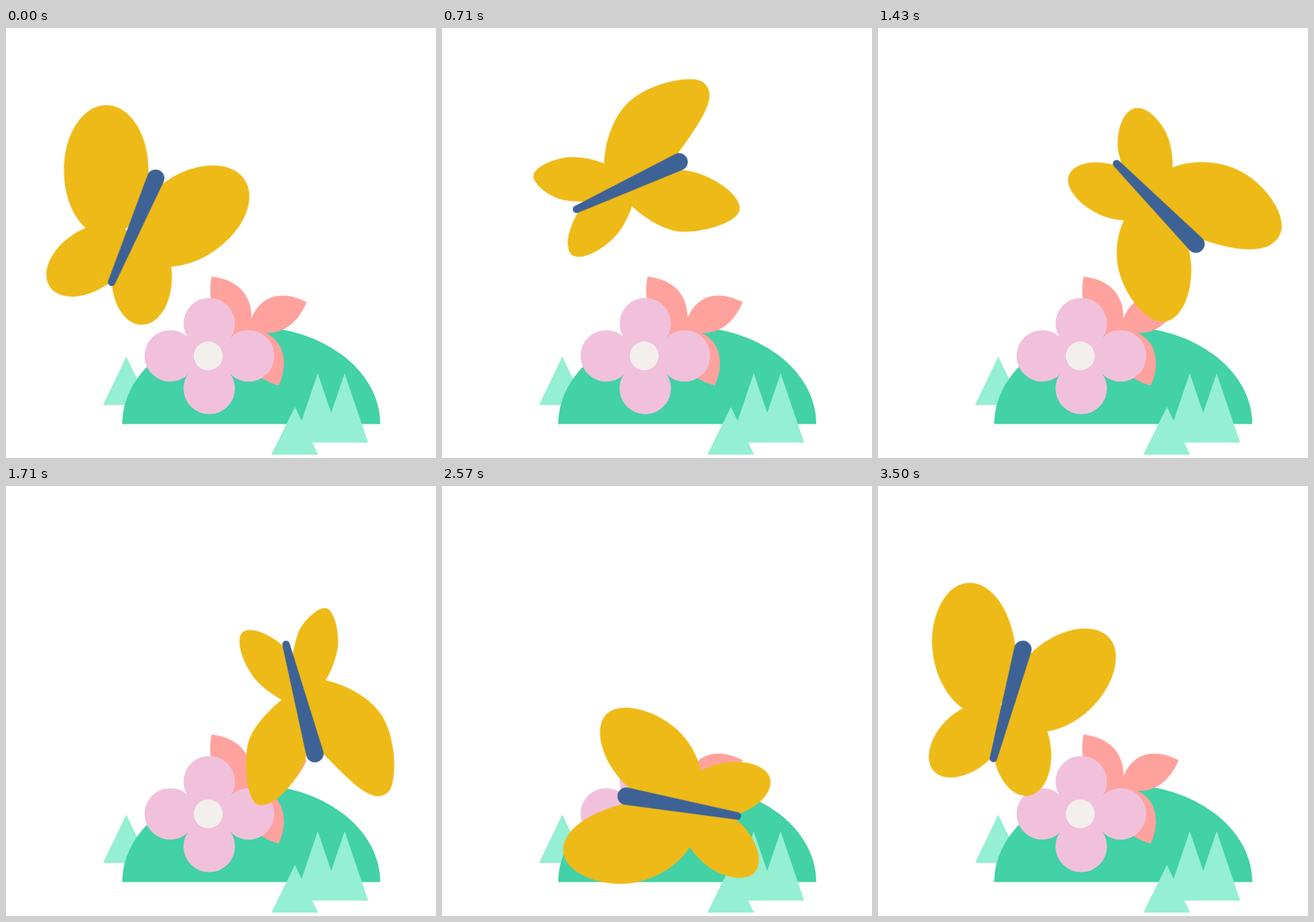
Write an HTML page without scripts that moves like this. It is 640x640 px and loops after 3.57 s.

```html
<!DOCTYPE html>
<html lang="en">
<head>
<meta charset="utf-8">
<title>Butterfly over a hill</title>
<style>
html, body { margin: 0; width: 100%; height: 100%; overflow: hidden; background: #fff; }
svg { display: block; width: 100%; height: 100%; }

.tree { fill: #94efd3; }
.hill { fill: #43d1a6; }
.leaf { fill: #ffa29d; }
.petal { fill: #f1c1dc; }
.wing { fill: #eeba18; }

.fly { animation: fly 3570ms linear infinite; }
.turn { animation: turn 3570ms linear infinite; }
.wing path { animation: 595ms linear infinite alternate; }
.ul { animation-name: ul !important; }
.ur { animation-name: ur !important; }
.ll { animation-name: ll !important; }
.lr { animation-name: lr !important; }

@keyframes fly {
  0%, 100% { transform: translate(189.5px, 302px); }
  7.98% { transform: translate(221px, 269px); }
  15.97% { transform: translate(260.5px, 247px); }
  19.89% { transform: translate(275.5px, 235px); }
  25.91% { transform: translate(318px, 222px); }
  31.93% { transform: translate(363px, 224px); }
  39.92% { transform: translate(413px, 260px); }
  47.9% { transform: translate(438px, 316px); }
  56.02% { transform: translate(442px, 380px); }
  64.15% { transform: translate(410px, 434px); }
  68.07% { transform: translate(387.5px, 459.5px); }
  71.99% { transform: translate(358px, 476.5px); }
  76.05% { transform: translate(319px, 482px); }
  80.11% { transform: translate(280px, 476px); }
  85.99% { transform: translate(241px, 443px); }
  92.02% { transform: translate(208px, 389px); }
  98.04% { transform: translate(193.5px, 325.5px); }
}
@keyframes turn {
  0% { transform: rotate(0deg); }
  19.89% { transform: rotate(42.2deg); }
  31.93% { transform: rotate(81.6deg); }
  47.9% { transform: rotate(142.2deg); }
  71.99% { transform: rotate(257.1deg); }
  85.99% { transform: rotate(308.3deg); }
  98.04% { transform: rotate(352.1deg); }
  100% { transform: rotate(360deg); }
}

/* folded wings; the open ones are in the markup */
@keyframes ul { to { d: path("M176 111C203 111 204 149 213 217C219 259 185 327 168 319.5C151 312 112 261 112 215.6C112 172 159 111 176 111Z"); } }
@keyframes ur { to { d: path("M333.6 214.2C341.8 232.5 301.7 284 286.4 294C268.6 306 233 312 201 315C187 299 207 248.5 234.3 229.2C261.5 207.6 322 196 333.6 214.2Z"); } }
@keyframes ll { to { d: path("M185.4 299C206.6 324.7 144 374 126.4 383C111 389.6 82.6 391.8 78 383.8C71.2 373.4 92 334.7 106.2 324.6C123.8 309.7 158.3 287.3 185.4 299Z"); } }
@keyframes lr { to { d: path("M199.6 300C209.2 306 222 347.5 222 367.4C222 398 209.2 432.5 195 431.3C183 429 172.5 412.3 164 387.7C160.6 365.4 180.6 300 199.6 300Z"); } }
</style>
</head>
<body>
<svg viewBox="0 0 640 640">
  <path class="tree" d="M179 489L213.5 561H144.500Z"/>
  <path class="hill" d="M173 589.500A192 145 0 0 1 557 589.500Z"/>
  <path class="leaf" d="M306 370C345 374 366 398 365.500 432C378 400 408 388 447.500 408C434 440 412 455 386 454C414 466 421 499 406 532C370 523 350 495 340 460C310 440 299 405 306 370Z"/>
  <g class="petal">
    <path d="M302.500 440L361 488L302.500 536.500L244.500 488Z"/>
    <circle cx="302.5" cy="440" r="38.3"/>
    <circle cx="361" cy="488" r="38.3"/>
    <circle cx="302.5" cy="536.5" r="38.3"/>
    <circle cx="244.5" cy="488" r="38.3"/>
  </g>
  <circle cx="301" cy="488" r="21.5" fill="#f3efec"/>
  <path class="tree" d="M464 514L499 617H429ZM504 514L539 617H469ZM430 564L464.500 635H395Z"/>

  <g class="fly"><g class="turn"><g transform="translate(-189.5 -302)">
    <g class="wing">
      <path class="ul" d="M149 115C184 115 212 158 212 212C212 266 184 310 149 310C114 310 86 266 86 212C86 158 114 115 149 115Z"/>
      <path class="ur" d="M354.8 225.5C374.3 254.3 353.8 302 309.2 332.2C264.6 362.3 212.7 363.3 193.2 334.5C173.7 305.7 194.2 258 238.8 227.8C283.4 197.7 335.3 196.7 354.8 225.5Z"/>
      <path class="ll" d="M183 305.8C196.8 326.4 181.7 361 149.2 382.8C116.7 404.7 79 405.8 65 385.2C51.2 364.6 66.3 330 98.8 308.2C131.3 286.3 169 285.2 183 305.8Z"/>
      <path class="lr" d="M202 300C227 300 247 331.8 247 371C247 410.2 227 442 202 442C177 442 157 410.2 157 371C157 331.8 177 300 202 300Z"/>
    </g>
    <path fill="#3d6295" d="M210.3 219.4A13 13 0 1 1 234.2 229.5L162.2 380.9A5.5 5.5 0 0 1 152 376.6Z"/>
  </g></g></g>
</svg>
</body>
</html>
```
